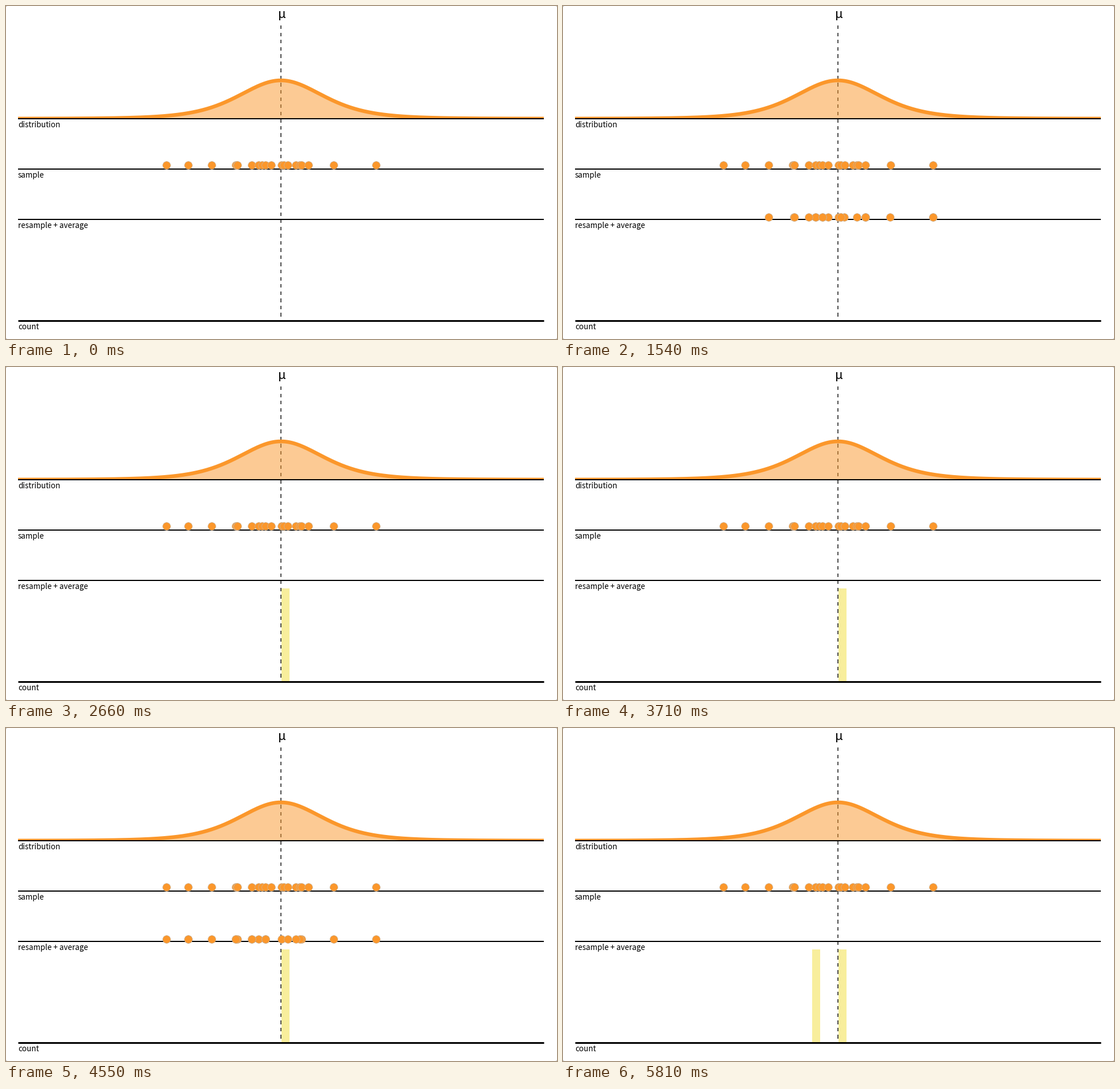
Animation, 962 px wide and 582 px high, one loop 5.88 s. Source, as a matplotlib script:

```python
import numpy as np
import matplotlib.pyplot as plt
from matplotlib.animation import FuncAnimation
from matplotlib.colors import to_rgb
from matplotlib.patches import Polygon, Rectangle

W, H, DPI = 962, 582, 64
FRAMES, STEP = 84, 70
PT = 72 / DPI  # points per pixel

ORANGE, YELLOW, PALE, EDGE = "#fb972b", "#f9dc0c", "#f8ee9c", "#c9b49c"
LEFT, RIGHT, MID = 21, 939, 480
BINS = 60
DUR = 420  # one transition, ms
START_Y, REST_Y, COUNT_Y = 284.5, 369, 545
BAR_BASE, BAR_TOP = 549, 387

SAMPLE = np.array([279.5, 317.5, 358.5, 400.5, 402.5, 404, 429, 440.5, 446.5, 453,
                   463, 480.5, 485, 491.5, 505.5, 513, 515.5, 528, 571.5, 646])
# start time and the picks from the sample, in order of release
ROUNDS = [
    (680, [7, 7, 19, 15, 4, 19, 6, 10, 9, 17, 2, 5, 11, 12, 18, 13, 17, 9, 17, 12]),
    (3755, [19, 2, 1, 16, 15, 0, 14, 7, 3, 6, 18, 9, 5, 11, 9, 1, 6, 3, 9, 13]),
]


def ease(t):
    t = np.clip(t, 0, 1)
    return np.where(t < 0.5, 4 * t**3, 1 - 4 * (1 - t)**3)


def mix(a, b, p):
    return tuple((1 - p) * np.array(to_rgb(a)) + p * np.array(to_rgb(b)))


fig = plt.figure(figsize=(W / DPI, H / DPI), dpi=DPI, facecolor="white")
ax = fig.add_axes([0, 0, 1, 1])
ax.set_xlim(0, W)
ax.set_ylim(H, 0)
ax.axis("off")


def dots(x, y, z):
    return ax.scatter(x, y, s=(13.6 * PT)**2, c=ORANGE, edgecolors=EDGE,
                      linewidths=0.7 * PT, zorder=z)


def label(x, y, text, size, **kw):
    ax.text(x, y, text, fontsize=size * PT, family="Noto Sans CJK JP",
            color="black", va="baseline", **kw)


# axes and labels
for y, width, text in [(197, 2, "distribution"), (285, 2, "sample"),
                       (373, 2, "resample + average"), (549.5, 3, "count")]:
    ax.plot([LEFT, RIGHT], [y, y], color="black", lw=width * PT,
            solid_capstyle="butt", zorder=5)
    label(LEFT, y + 15 if y < 500 else y + 15.5, text, 13.4)
label(481.5, 21, "\u00b5", 22, ha="center", weight="medium")

# dashed mean line
dash = 6.28
tops = 34 + 2 * dash * np.arange(41)
ax.vlines(np.full(tops.size, MID), tops, tops + dash, color="#222222",
          lw=1.6 * PT, zorder=1)

# Student t density, five degrees of freedom
xs = np.linspace(LEFT, RIGHT, 460)
ys = 197 - 67 * (1 + ((xs - MID) / 76.5)**2 / 5)**-3
ax.fill_between(xs, ys, 197, color=ORANGE, alpha=0.5, lw=0, zorder=2)
curve, = ax.plot(xs, ys, color=ORANGE, lw=6.5 * PT, solid_capstyle="butt", zorder=3)
curve.set_clip_path(Rectangle((0, 0), W, 197, transform=ax.transData))

# rounded window corners
for cx, sx in [(0, 1), (W, -1)]:
    for cy, sy in [(0, 1), (H, -1)]:
        ax.add_patch(Polygon([(cx, cy), (cx + 2 * sx, cy), (cx, cy + 2 * sy)],
                             color="#c4c4c4", lw=0))

dots(SAMPLE, np.full(SAMPLE.size, 278), 6)

rounds = []
for start, picks in ROUNDS:
    x = SAMPLE[picks]
    bin_w = (RIGHT - LEFT) / BINS
    left = LEFT + bin_w * np.floor((x.mean() - LEFT) / bin_w)
    bar = Rectangle((left + 0.9, BAR_BASE), bin_w - 1.3, 0, color=PALE, lw=0, zorder=4)
    ax.add_patch(bar)
    rounds.append((start, x, dots(x, np.full(x.size, START_Y), 7), bar))


def update(frame):
    for start, x, balls, bar in rounds:
        t = (frame * STEP - start) / DUR
        fall = ease(t - np.arange(x.size) / x.size)
        gather = float(ease(t - 2))
        drop = ease(t - 3)
        grow = float(ease((t - 4) * 2))

        y = START_Y + (REST_Y - START_Y) * fall + (COUNT_Y - REST_Y) * drop
        balls.set_offsets(np.column_stack([x + (x.mean() - x) * gather, y]))
        balls.set_facecolor(mix(ORANGE, YELLOW, gather))
        balls.set_edgecolor(mix(EDGE, YELLOW, gather))
        balls.set_visible(0 <= t < 4)
        bar.set_height((BAR_TOP - BAR_BASE) * grow)
        bar.set_visible(grow > 0)
    return []


anim = FuncAnimation(fig, update, frames=FRAMES, interval=STEP,
                     init_func=lambda: update(0), repeat=True, repeat_delay=0)
plt.show()
```
